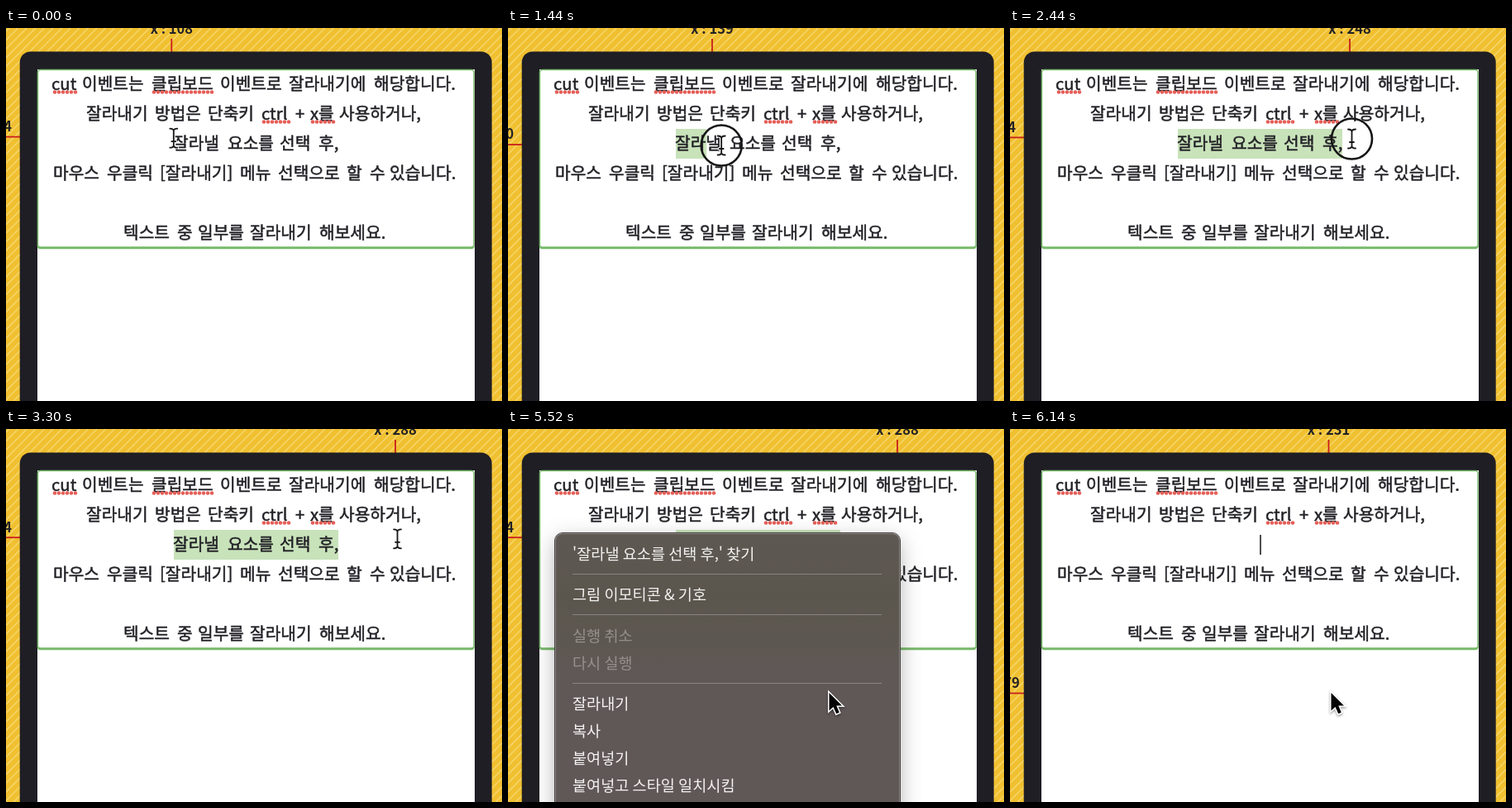
Recreate the animation shown at these times as an HTML page with a canvas. Size 600 by 451 pixels, loop 6.22 s.

```html
<!DOCTYPE html>
<html lang="ko">
<head>
<meta charset="utf-8">
<title>cut 이벤트</title>
<style>
  html, body { margin: 0; width: 100%; height: 100%; overflow: hidden; background: #f0c030; }
  canvas { display: block; width: 600px; height: 451px; }
</style>
</head>
<body>
<canvas id="stage" width="600" height="451"></canvas>
<script>
const ctx = document.getElementById('stage').getContext('2d');
const W = 600, H = 451, LOOP = 6220;
const FONT = '"Noto Sans CJK KR", "Noto Sans CJK", "Noto Sans CJK JP", sans-serif';
const INK = '#222126';

// Timeline in ms
const PRESS = 690, RELEASE = 2580, MENU_OPEN = 3900, MENU_CLOSE = 5720, MENU_FADE = 140;

// Pointer path: time, x, y
const PATH = [
  [0, 202.8, 133.2], [960, 202.8, 133.2], [1340, 242, 143], [1440, 258, 142], [1900, 338, 138],
  [2380, 413.5, 134], [2620, 413.5, 134], [3180, 473.5, 132.8], [4380, 473.5, 132.8],
  [4580, 422, 177], [4980, 400, 262], [5480, 388, 318], [LOOP, 388, 318]
];

// Paragraph words with their left edges
const TEXT_SIZE = 20.3;
const LINES = [
  { y: 68, words: [['cut', 55], ['이벤트는', 92], ['클립보드', 176], ['이벤트로', 259], ['잘라내기에', 342], ['해당합니다.', 445]] },
  { y: 104, words: [['잘라내기', 97], ['방법은', 180], ['단축키', 244], ['ctrl', 309], ['+', 350], ['x를', 368], ['사용하거나,', 403]] },
  { y: 140, words: [['잘라낼', 202], ['요소를', 268], ['선택', 331], ['후,', 378]], cut: true },
  { y: 176, words: [['마우스', 57], ['우클릭', 122], ['[잘라내기]', 186], ['메뉴', 283], ['선택으로', 329], ['할', 412], ['수', 440], ['있습니다.', 464]] },
  { y: 248, words: [['텍스트', 142], ['중', 207], ['일부를', 232], ['잘라내기', 295], ['해보세요.', 379]] }
];
const MARKS = [[57, 85, 77.5], [177, 253, 77.5], [310, 345, 113.5], [369, 398, 113.5]];

const MENU = [
  ["'잘라낼 요소를 선택 후,' 찾기", 151], ['그림 이모티콘 & 기호', 200],
  ['실행 취소', 250, true], ['다시 실행', 283, true],
  ['잘라내기', 332], ['복사', 365], ['붙여넣기', 398], ['붙여넣고 스타일 일치시킴', 431]
];

const clamp = (v, a, b) => Math.max(a, Math.min(b, v));

// Slope at a path point; zero where the pointer rests
function slope(i, axis) {
  const a = PATH[i - 1], b = PATH[i], c = PATH[i + 1];
  if (!a || !c) return 0;
  const d0 = b[axis] - a[axis], d1 = c[axis] - b[axis];
  if (d0 * d1 <= 0) return 0;
  return (c[axis] - a[axis]) / (c[0] - a[0]);
}

function pointer(t) {
  t = clamp(t, 0, LOOP);
  let i = 0;
  while (i < PATH.length - 2 && PATH[i + 1][0] <= t) i++;
  const a = PATH[i], b = PATH[i + 1], h = b[0] - a[0], u = (t - a[0]) / h;
  const at = k =>
    (1 + 2 * u) * (1 - u) ** 2 * a[k] + u * (1 - u) ** 2 * h * slope(i, k) +
    u * u * (3 - 2 * u) * b[k] + u * u * (u - 1) * h * slope(i + 1, k);
  return { x: at(1), y: at(2) };
}

// What the page has seen of the pointer
function tracked(t) {
  const seen = t > MENU_OPEN && t < MENU_CLOSE ? MENU_OPEN : t - 50;
  const p = pointer(seen);
  return { x: p.x - 2.5, y: p.y + (seen > MENU_OPEN ? 1.5 : -1.6) };
}

function line(x0, y0, x1, y1, color, width) {
  ctx.strokeStyle = color;
  ctx.lineWidth = width;
  ctx.beginPath();
  ctx.moveTo(x0, y0);
  ctx.lineTo(x1, y1);
  ctx.stroke();
}

function box(x, y, w, h, r) {
  ctx.beginPath();
  ctx.roundRect(x, y, w, h, r);
}

function setFont(size, weight) {
  ctx.font = `${weight} ${size}px ${FONT}`;
}

function drawBackdrop() {
  ctx.fillStyle = '#f0c030';
  ctx.fillRect(0, 0, W, H);
  const step = 7.5 * Math.SQRT2;
  for (let x = 4; x < W + H; x += step) line(x, 0, x - H, H, '#f5d56c', 1.5);
}

function drawRulers(t) {
  const p = tracked(t);
  const red = '#c81e1c';
  line(p.x, 13, p.x, 29, red, 1.8);
  line(0, p.y, 18, p.y, red, 1.8);
  setFont(16.5, 700);
  ctx.fillStyle = INK;
  ctx.textAlign = 'center';
  ctx.fillText('x : ' + Math.floor((p.x - 38.2) / 1.5), p.x, 6.5);
  ctx.fillText('y : ' + Math.floor((p.y - 50) / 1.5), -14, p.y - 6.5);
  ctx.textAlign = 'left';
}

function drawScreen() {
  ctx.fillStyle = '#1f1e24';
  box(16.7, 28.5, 571, 500, 13);
  ctx.fill();
  ctx.fillStyle = '#fff';
  ctx.fillRect(38, 50, 529, H);
  ctx.fillStyle = '#78b96b';
  box(37.7, 49.7, 529, 217.6, 4);
  ctx.fill();
  ctx.fillStyle = '#fff';
  box(39.2, 51.2, 526, 213, 2);
  ctx.fill();
}

// Selection end snaps to the nearest letter edge
function selectionEnd(x) {
  setFont(TEXT_SIZE, 400);
  const edges = [];
  for (const [word, left] of LINES[2].words)
    for (let i = 0; i <= word.length; i++)
      edges.push(left + 1 + ctx.measureText(word.slice(0, i)).width);
  edges[edges.length - 1] = 402;
  return edges.reduce((a, b) => Math.abs(b - x) < Math.abs(a - x) ? b : a);
}

function drawSelection(t) {
  if (t < PRESS || t >= MENU_CLOSE) return;
  const end = selectionEnd(tracked(Math.min(t, RELEASE)).x);
  ctx.fillStyle = '#c8e2ba';
  ctx.fillRect(203, 122, end - 203, 36);
}

function drawText(t) {
  setFont(TEXT_SIZE, 400);
  ctx.fillStyle = ctx.strokeStyle = INK;
  ctx.lineWidth = 0.5;
  ctx.lineJoin = 'round';
  for (const row of LINES) {
    if (row.cut && t >= MENU_CLOSE) continue;
    for (const [word, x] of row.words) {
      ctx.fillText(word, x, row.y + 7.3);
      ctx.strokeText(word, x, row.y + 7.3);
    }
  }
  ctx.fillStyle = '#e4605a';
  for (const [x0, x1, y] of MARKS)
    for (let x = x0 + 2; x < x1; x += 5) {
      ctx.beginPath();
      ctx.arc(x, y, 2.3, 0, 7);
      ctx.fill();
    }
  if (t >= MENU_CLOSE) line(303, 128, 303, 152, INK, 1.6);
}

function drawMenu(t) {
  if (t < MENU_OPEN || t > MENU_CLOSE + MENU_FADE) return;
  ctx.save();
  ctx.globalAlpha = clamp((MENU_CLOSE + MENU_FADE - t) / MENU_FADE, 0, 1);
  const fill = ctx.createLinearGradient(0, 126, 0, 300);
  fill.addColorStop(0, '#5e5853');
  fill.addColorStop(0.45, '#5b564d');
  fill.addColorStop(0.75, '#5d5751');
  fill.addColorStop(1, '#605857');
  ctx.save();
  ctx.shadowColor = 'rgba(0,0,0,.3)';
  ctx.shadowBlur = 26;
  ctx.shadowOffsetY = 8;
  ctx.fillStyle = fill;
  box(57, 126, 417, 400, 9);
  ctx.fill();
  ctx.restore();
  ctx.lineWidth = 1;
  ctx.strokeStyle = '#45413f';
  box(56.5, 125.5, 418, 400, 9.5);
  ctx.stroke();
  ctx.strokeStyle = '#8b8684';
  box(57.5, 126.5, 416, 400, 8.5);
  ctx.stroke();
  for (const y of [175.5, 224.5, 307.5]) line(78, y, 452, y, '#8a8482', 1);
  setFont(18.6, 400);
  for (const [label, y, off] of MENU) {
    ctx.fillStyle = off ? '#958f8c' : '#f4f2f1';
    ctx.fillText(label, 78, y + 7);
  }
  ctx.restore();
}

function drawBeam(p) {
  ctx.lineCap = 'round';
  for (const [color, width] of [['#fff', 3.8], ['#161616', 1.8]]) {
    ctx.strokeStyle = color;
    ctx.lineWidth = width;
    ctx.beginPath();
    for (const s of [-1, 1]) {
      ctx.moveTo(p.x - 4.5, p.y + s * 11.5);
      ctx.quadraticCurveTo(p.x, p.y + s * 11.5, p.x, p.y + s * 8.5);
      ctx.quadraticCurveTo(p.x, p.y + s * 11.5, p.x + 4.5, p.y + s * 11.5);
    }
    ctx.moveTo(p.x, p.y - 9);
    ctx.lineTo(p.x, p.y + 9);
    ctx.moveTo(p.x - 2.5, p.y + 4);
    ctx.lineTo(p.x + 2.5, p.y + 4);
    ctx.stroke();
  }
  ctx.lineCap = 'butt';
}

function drawArrow(p) {
  ctx.save();
  ctx.translate(p.x + 0.5, p.y + 1);
  ctx.beginPath();
  for (const [x, y] of [[0, 0], [0, 21.5], [5, 17], [8.7, 25.3], [12.3, 23.7], [8.8, 15.5], [15.5, 15.5]])
    ctx.lineTo(x, y);
  ctx.closePath();
  ctx.shadowColor = 'rgba(0,0,0,.4)';
  ctx.shadowBlur = 3;
  ctx.shadowOffsetY = 1.5;
  ctx.strokeStyle = '#fff';
  ctx.lineWidth = 3;
  ctx.lineJoin = 'miter';
  ctx.stroke();
  ctx.shadowColor = 'transparent';
  ctx.fillStyle = '#050505';
  ctx.fill();
  ctx.restore();
}

function drawPointer(t) {
  const p = pointer(t);
  if (t >= MENU_OPEN) drawArrow(p);
  else drawBeam(p);
  if (t >= PRESS && t < RELEASE) {
    ctx.strokeStyle = '#151515';
    ctx.lineWidth = 2.6;
    ctx.beginPath();
    ctx.arc(p.x, p.y, 24.5, 0, 7);
    ctx.stroke();
  }
}

function draw(t) {
  drawBackdrop();
  drawRulers(t);
  drawScreen();
  drawSelection(t);
  drawText(t);
  drawMenu(t);
  drawPointer(t);
}

const start = performance.now();
function tick() {
  draw((performance.now() - start) % LOOP);
  requestAnimationFrame(tick);
}
tick();
</script>
</body>
</html>
```
